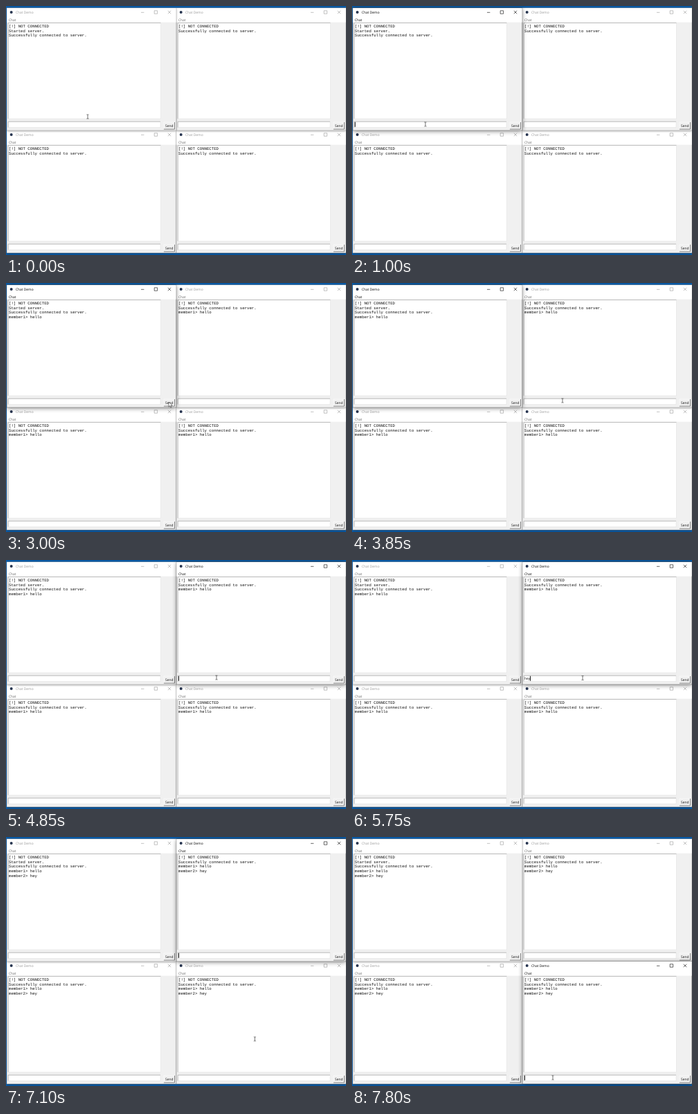
Write an HTML page that moves like this. It is 491 by 360 pixels and loops after 8 s.

```html
<!DOCTYPE html>
<html lang="en">
<head>
<meta charset="utf-8">
<title>Chat Demo</title>
<style>
  html, body { margin: 0; width: 100%; height: 100%; overflow: hidden; background: #0a5aa5; }
  svg { display: block; width: 100%; height: 100%; }
  text { white-space: pre; text-rendering: geometricPrecision; user-select: none; }
  .ui { font: 4.9px "Open Sans", "Noto Sans", sans-serif; }
  .log { font: 5.7px "Liberation Mono", monospace; fill: #111; }
</style>
</head>
<body>
<svg id="stage" viewBox="0 0 491 360" preserveAspectRatio="none">
  <defs>
    <filter id="soft" x="-10%" y="-10%" width="120%" height="120%"><feGaussianBlur stdDeviation="1.6"/></filter>
    <filter id="deep" x="-10%" y="-10%" width="120%" height="120%"><feGaussianBlur stdDeviation="3.2"/></filter>
  </defs>
  <rect width="491" height="360" fill="#0a5aa5"/>
</svg>
<script>
const LOOP = 8000;
const stage = document.getElementById('stage');

function add(parent, tag, attrs, text) {
  const el = document.createElementNS('http://www.w3.org/2000/svg', tag);
  for (const key in attrs) el.setAttribute(key, attrs[key]);
  if (text !== undefined) el.textContent = text;
  parent.appendChild(el);
  return el;
}
const set = (el, key, value) => {
  if (el.getAttribute(key) !== String(value)) el.setAttribute(key, value);
};
const show = (el, on) => set(el, 'visibility', on ? 'visible' : 'hidden');

// Clicks that give a window the focus
const clicks = [{ at: 450, win: 0 }, { at: 3950, win: 1 }, { at: 7550, win: 3 }];

// Typed messages: key times, then press and release of Send
const sends = [
  { win: 0, text: 'hello', keys: [1250, 1400, 1550, 1650, 1800], press: 2850, sent: 3000, line: 'member1> hello' },
  { win: 1, text: 'hey', keys: [4900, 5000, 5100], press: 6300, sent: 6450, line: 'member2> hey' }
];

// Pointer moves: start, end, target x, target y, downward bow
const home = [118, 160];
const moves = [
  [50, 400, 106, 171, 0],
  [2400, 2840, 235, 172, 0],
  [3500, 3720, 304, 170, 0],
  [5570, 6270, 479, 173, 0],
  [6470, 7540, 290, 348, 9]
];

function makeWindow(index) {
  const g = add(stage, 'g', { transform: `translate(${index % 2 * 245} ${index > 1 ? 177 : 0})` });
  const box = (x, y, width, height, fill, more) => add(g, 'rect', { x, y, width, height, fill, ...more });
  const line = (d, stroke, w = 0.5) => add(g, 'path', { d, stroke, 'stroke-width': w, fill: 'none' });

  const shadow = box(1.5, 4, 244, 177, '#000');
  const frame = box(1, 2.6, 245, 177.6, '#aaa');
  box(1.4, 3, 244.1, 176.7, '#f0f0f0');
  box(1.4, 3, 244.1, 20.6, '#fff');
  add(g, 'circle', { cx: 7.7, cy: 9, r: 2, fill: '#26344f' });
  const title = add(g, 'text', { class: 'ui', x: 14, y: 10.9 }, 'Chat Demo');
  const menu = add(g, 'text', { class: 'ui', x: 4, y: 21.8 }, 'Chat');
  const icons = line('M195 9.3h4.4M214.2 6.8h4.4v4.4h-4.4zM233.8 6.8l4.4 4.4m0-4.4l-4.4 4.4', '#000', 0.6);

  // Sunken log and entry fields
  box(3, 24.2, 220.5, 138.8, '#fff');
  line('M3.2 163V24.4H223.5', '#777');
  line('M3.2 163H223.5V24.4', '#dcdcdc');
  box(3, 167, 220, 8.6, '#fff');
  line('M3.2 175.6V167.2H223', '#777');
  line('M3.2 175.6H223V167.2', '#dcdcdc');

  box(227.8, 167.8, 15.8, 10.4, '#f0f0f0');
  const light = line('M227.9 178.2V168H243.6', '#fff');
  const dark = line('M227.9 178.1H243.5V168', '#555', 0.7);
  const label = add(g, 'text', { class: 'ui', x: 235.7, y: 174.8, 'text-anchor': 'middle', fill: '#111' }, 'Send');

  const intro = ['[!] NOT CONNECTED', 'Successfully connected to server.'];
  if (index === 0) intro.splice(1, 0, 'Started server.');
  const row = (str, i) => add(g, 'text', { class: 'log', x: 4, y: 30.9 + i * 6.77 }, str);
  intro.forEach(row);
  const lines = sends.map((s, i) => row(s.line, intro.length + i));

  const entry = add(g, 'text', { class: 'ui', x: 4, y: 172.7, fill: '#111' }, '');
  const caret = box(4, 167.8, 0.9, 7, '#000');
  return { g, shadow, frame, title, menu, icons, light, dark, label, lines, entry, caret };
}

const stack = [2, 3, 1, 0];
const wins = [];
stack.forEach(i => { wins[i] = makeWindow(i); });

const beam = add(stage, 'path', {
  d: 'M-1.5-3h1.1l.4.4l.4-.4h1.1M0-2.6V2.6M-1.5 3h1.1l.4-.4l.4.4h1.1',
  fill: 'none', stroke: '#222', 'stroke-width': 0.65
});
const arrow = add(stage, 'path', {
  d: 'M0 0V7.2L1.7 5.6L2.8 8.1L3.9 7.6L2.8 5.2H5.1Z',
  fill: '#fff', stroke: '#111', 'stroke-width': 0.5
});

function pointerAt(t) {
  let [x, y] = home;
  for (const [from, to, tx, ty, bow] of moves) {
    if (t < from) break;
    const p = Math.min(1, (t - from) / (to - from));
    const e = p * p * (3 - 2 * p);
    x += (tx - x) * e;
    y += (ty - y) * e + bow * Math.sin(Math.PI * e);
  }
  return [x, y];
}

function overText(x, y) {
  const lx = x > 246 ? x - 245 : x;
  const ly = y > 180 ? y - 177 : y;
  return lx > 3 && lx < 223.5 && (ly > 24 && ly < 163 || ly > 167 && ly < 176);
}

let raised = -1;
function raise(active) {
  if (active === raised) return;
  raised = active;
  const order = stack.filter(i => i !== active);
  if (active !== null) order.push(active);
  order.forEach(i => stage.insertBefore(wins[i].g, beam));
}

function drawWindow(w, i, t, click) {
  const active = !!click && click.win === i;
  const ink = active ? '#000' : '#999';
  set(w.shadow, 'filter', active ? 'url(#deep)' : 'url(#soft)');
  set(w.shadow, 'opacity', active ? 0.5 : 0.35);
  set(w.frame, 'fill', active ? '#666' : '#aaa');
  set(w.title, 'fill', ink);
  set(w.menu, 'fill', active ? '#000' : '#666');
  set(w.icons, 'stroke', ink);

  const s = sends.find(m => m.win === i);
  const pressed = !!s && t >= s.press && t < s.sent;
  set(w.light, 'stroke', pressed ? '#666' : '#fff');
  set(w.dark, 'stroke', pressed ? '#fff' : '#555');
  set(w.label, 'transform', pressed ? 'translate(.4 .4)' : 'translate(0 0)');

  const typed = s && t < s.sent ? s.text.slice(0, s.keys.filter(k => t >= k).length) : '';
  if (w.entry.textContent !== typed) w.entry.textContent = typed;
  // Caret blinks 600 ms on, 300 ms off
  const lit = active && (t - click.at) % 900 < 600;
  show(w.caret, lit);
  if (lit) set(w.caret, 'x', 4 + (typed ? w.entry.getComputedTextLength() : 0));
  w.lines.forEach((el, n) => show(el, t >= sends[n].sent));
}

function render(t) {
  const click = clicks.filter(c => t >= c.at).pop();
  raise(click ? click.win : null);
  wins.forEach((w, i) => drawWindow(w, i, t, click));

  const [x, y] = pointerAt(t);
  const text = overText(x, y);
  show(beam, text);
  show(arrow, !text);
  set(text ? beam : arrow, 'transform', `translate(${x.toFixed(2)} ${y.toFixed(2)})`);
}

const start = performance.now();
function tick() {
  render((performance.now() - start) % LOOP);
  requestAnimationFrame(tick);
}
tick();
</script>
</body>
</html>
```
